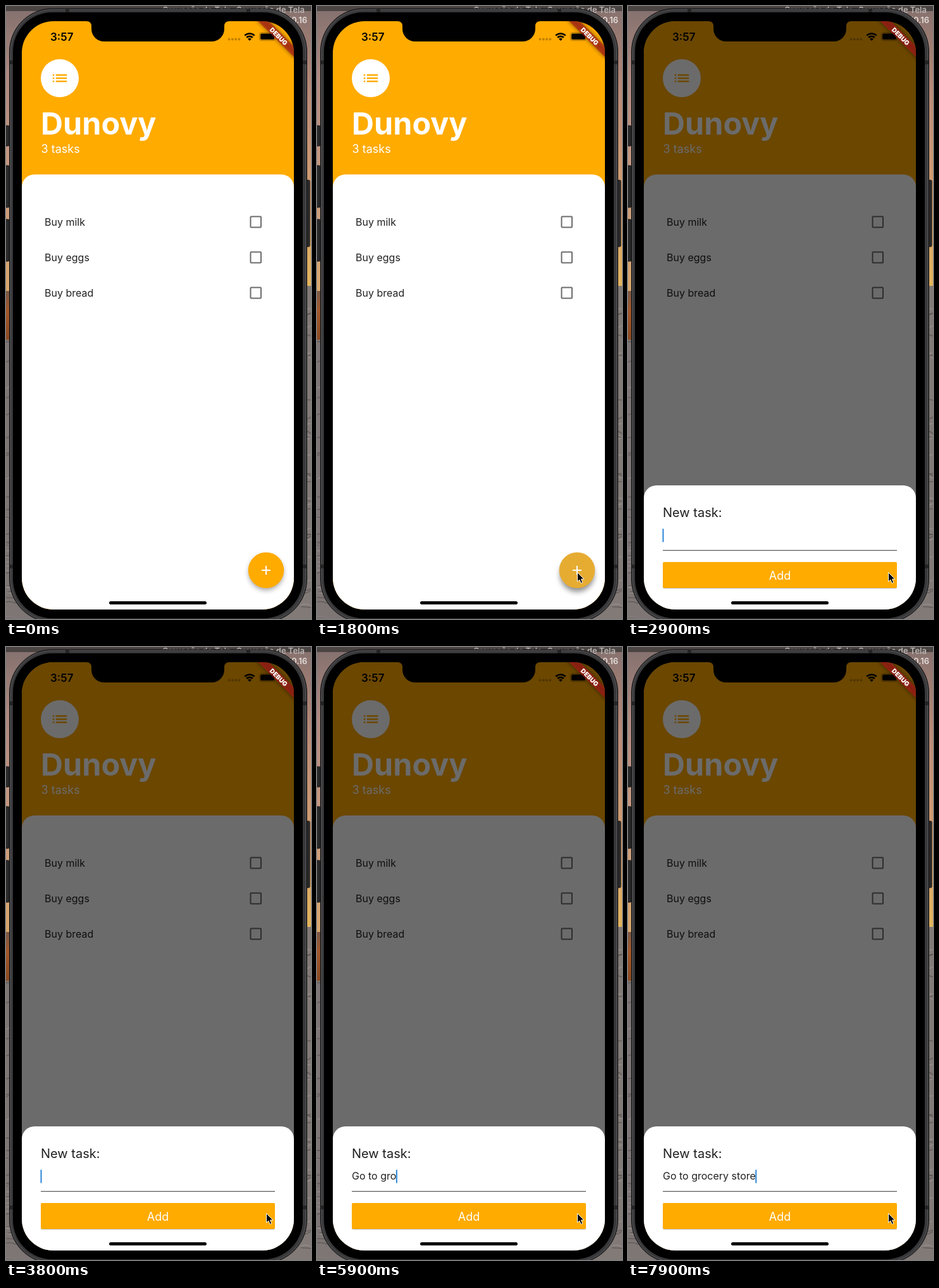
Write an HTML page that moves like this. It is 482x968 px and loops after 8 s.

```html
<!DOCTYPE html>
<html lang="en">
<head>
<meta charset="utf-8">
<title>Task list</title>
<style>
  html, body { margin: 0; width: 100%; height: 100%; overflow: hidden; background: #000; }
  svg { display: block; width: 482px; height: 968px; }
  text { font-family: Inter, "Liberation Sans", sans-serif; white-space: pre; }
</style>
</head>
<body>
<svg viewBox="0 0 482 968" xmlns="http://www.w3.org/2000/svg">
  <defs>
    <linearGradient id="skyLeft" x2="0" y2="1">
      <stop offset="0" stop-color="#82706e"/>
      <stop offset=".25" stop-color="#b08a80"/>
      <stop offset=".6" stop-color="#c99a80"/>
      <stop offset="1" stop-color="#d9a86c"/>
    </linearGradient>
    <linearGradient id="skyRight" x2="0" y2="1">
      <stop offset="0" stop-color="#85716e"/>
      <stop offset=".3" stop-color="#b98a78"/>
      <stop offset=".7" stop-color="#d6a070"/>
      <stop offset="1" stop-color="#e2b45e"/>
    </linearGradient>
    <linearGradient id="cliff" x2="0" y2="1">
      <stop offset="0" stop-color="#7a5a48"/>
      <stop offset=".4" stop-color="#a5582a"/>
      <stop offset="1" stop-color="#8a4a22"/>
    </linearGradient>
    <clipPath id="screen"><rect x="25" y="24" width="430" height="929" rx="50"/></clipPath>
    <filter id="blur4" x="-50%" y="-50%" width="200%" height="200%"><feGaussianBlur stdDeviation="4"/></filter>
    <filter id="blur3" x="-50%" y="-100%" width="200%" height="300%"><feGaussianBlur stdDeviation="3"/></filter>
  </defs>

  <!-- desktop -->
  <rect width="241" height="450" fill="url(#skyLeft)"/>
  <rect x="241" width="241" height="442" fill="url(#skyRight)"/>
  <rect width="482" height="8" fill="#4a4443"/>
  <rect y="450" width="241" height="78" fill="url(#cliff)"/>
  <rect y="527" width="241" height="441" fill="#7d7674"/>
  <rect x="241" y="442" width="241" height="526" fill="#827a77"/>
  <g id="rocks" stroke-width="1.5" fill="none"></g>
  <g font-size="13" font-weight="600" fill="#b9b3b1">
    <text x="247" y="11">Gravação de Tela</text>
    <text x="472" y="11" text-anchor="end">Gravação de Tela</text>
    <text x="476" y="27" text-anchor="end" fill="#e4dedc">20.10.16</text>
  </g>

  <!-- phone body -->
  <g id="buttons" fill="#2b2a2b" stroke="#151515"></g>
  <rect x="5.5" y="4" width="470" height="969" rx="68" fill="#38383a" stroke="#141414"/>
  <rect x="7.5" y="6" width="466" height="965" rx="66" fill="none" stroke="#5a5a5c" stroke-width=".8"/>
  <g id="bands" fill="#242425"></g>
  <rect x="11" y="10" width="458" height="957" rx="62" fill="#000"/>

  <g clip-path="url(#screen)">
    <rect x="25" y="24" width="430" height="929" fill="#ffab00"/>
    <circle cx="85" cy="114" r="30" fill="#fff"/>
    <path transform="translate(70 99) scale(1.25)" fill="#ffab00"
      d="M3 13h2v-2H3zm0 4h2v-2H3zm0-8h2V7H3zm4 4h14v-2H7zm0 4h14v-2H7zM7 7v2h14V7z"/>
    <text x="55" y="202.500" font-size="48.500" font-weight="700" fill="#fff">Dunovy</text>
    <text x="55.500" y="232" font-size="18" fill="#fff">3 tasks</text>
    <rect x="25" y="266" width="430" height="720" rx="20" fill="#fff"/>
    <g id="list" font-size="16" fill="#212121"></g>

    <g id="fab">
      <circle id="fabShadow" cx="411" cy="895" r="27" fill="#000" filter="url(#blur4)"/>
      <circle id="fabFace" cx="411" cy="891" r="28.300"/>
      <path d="M404 891h14M411 884v14" stroke="#fff" stroke-width="2"/>
    </g>

    <g id="sheet">
      <rect x="25" y="24" width="430" height="929" fill="#000" opacity=".58"/>
      <rect x="25" y="757" width="430" height="230" rx="20" fill="#fff"/>
      <text x="55" y="806.500" font-size="20" fill="#212121">New task:</text>
      <text id="entry" x="55" y="841" font-size="16" fill="#212121"></text>
      <rect id="caret" y="825.500" width="2" height="21" fill="#2b86d9"/>
      <rect x="55" y="859" width="370" height="1.200" fill="#555"/>
      <rect x="55" y="879" width="370" height="41" rx="2" fill="#000" opacity=".25"/>
      <rect x="55" y="878" width="370" height="41" rx="2" fill="#ffab00"/>
      <text x="240" y="905.500" font-size="18" text-anchor="middle" fill="#fff">Add</text>
    </g>

    <!-- status bar -->
    <text x="70" y="54.500" font-size="17" font-weight="600">3:57</text>
    <g id="dots" opacity=".25"></g>
    <g fill="none" stroke="#000" stroke-width="2.600">
      <path d="M377.300 46.600a11 11 0 0 1 15.400 0M380.200 49.800a7 7 0 0 1 9.600 0"/>
    </g>
    <path d="M385 55l-2.800-3a4 4 0 0 1 5.600 0z"/>
    <rect x="400.500" y="42" width="25" height="12.500" rx="3.500" fill="none" stroke="#000" stroke-opacity=".4"/>
    <rect x="402" y="43.500" width="22" height="9.500" rx="2.200"/>

    <!-- corner ribbon -->
    <g transform="translate(455 24) rotate(45)">
      <rect x="-44" y="28" width="88" height="12" fill="#000" opacity=".5" filter="url(#blur3)"/>
      <rect x="-44" y="28" width="88" height="12" fill="#b71c1c" opacity=".63"/>
      <text y="37.700" font-size="10" font-weight="900" text-anchor="middle" fill="#fff">DEBUG</text>
    </g>
    <rect x="163" y="940" width="154" height="5" rx="2.500"/>
  </g>
  <path d="M127 23H353v1q-8 0-8 8v4a20 20 0 0 1-20 20H155a20 20 0 0 1-20-20v-4q0-8-8-8z"/>

  <path id="pointer" d="M0 0V14.500L3.300 11.500 5.700 17 8.300 15.900 6 10.500H10.500Z" stroke="#fff"/>
</svg>

<script>
const LOOP = 8000, STEP = 100, OPEN = 1900;
const HOME = [411.5, 894.5], ENTRY = [486, 962];
const ENTER = 1000, ARRIVE = 1500;
const TASK = 'Go to grocery store';
// [time, characters typed]
const TYPING = [[3900, 0], [5000, 6], [6700, 13], [7900, 19]];

const $ = id => document.getElementById(id);
const add = (id, name, attrs, text = '') => {
  const el = document.createElementNS('http://www.w3.org/2000/svg', name);
  for (const key in attrs) el.setAttribute(key, attrs[key]);
  el.textContent = text;
  $(id).append(el);
};

['Buy milk', 'Buy eggs', 'Buy bread'].forEach((label, i) => {
  const y = 341 + 56 * i;
  add('list', 'text', { x: 61, y: y + 6 }, label);
  add('list', 'rect', { x: 386.5, y: y - 8.5, width: 16.5, height: 17, rx: 1,
    fill: 'none', stroke: '#6c6c6c', 'stroke-width': 2 });
});
for (let i = 0; i < 4; i++) add('dots', 'circle', { cx: 352.5 + 5.3 * i, cy: 52.5, r: 1.9 });
[[-2, 189, 32], [-2, 252, 66], [-2, 337, 66], [473, 275, 105]].forEach(([x, y, height]) =>
  add('buttons', 'rect', { x, y, width: 7, height, rx: 1.5 }));
[[6, 86], [469, 86], [6, 882], [469, 882]].forEach(([x, y]) =>
  add('bands', 'rect', { x, y, width: 6, height: 6 }));
[94, 380].forEach(x => add('bands', 'rect', { x, y: 4, width: 6, height: 6 }));

let seed = 7;
const random = () => (seed = seed * 16807 % 2147483647) / 2147483647;
for (let i = 0; i < 70; i++) {
  const right = i % 2;
  const x = right ? 466 : -2;
  const top = right ? 450 : 530;
  const y = top + random() * (968 - top);
  add('rocks', 'path', {
    d: `M${x} ${y}q9 ${random() * 8 - 6} 18 ${random() * 14 - 8}`,
    stroke: random() < .6 ? '#4f4a49' : '#a09896', opacity: .6
  });
}

const pen = document.createElement('canvas').getContext('2d');
pen.font = '16px Inter, "Liberation Sans", sans-serif';

function typedAt(t) {
  if (t <= TYPING[0][0]) return 0;
  const next = TYPING.findIndex(([time]) => time >= t);
  const [t0, n0] = TYPING[next - 1], [t1, n1] = TYPING[next];
  return Math.floor(n0 + (n1 - n0) * (t - t0) / (t1 - t0) + 1e-6);
}

function draw(t) {
  const open = t >= OPEN;
  const raw = Math.min(1, Math.max(0, (t - ENTER) / (ARRIVE - ENTER)));
  const ease = 1 - (1 - raw) ** 3;
  const [x, y] = ENTRY.map((from, i) => from + (HOME[i] - from) * ease);
  $('pointer').setAttribute('transform', `translate(${x} ${y})`);
  $('pointer').style.display = t < ENTER ? 'none' : '';

  const hover = Math.hypot(x - 411, y - 891) < 28;
  $('fabFace').setAttribute('fill', hover ? '#e6ac32' : '#ffab00');
  $('fabShadow').setAttribute('cy', hover ? 898 : 895);
  $('fabShadow').setAttribute('opacity', hover ? .45 : .4);
  $('sheet').style.display = open ? '' : 'none';

  const words = TASK.slice(0, typedAt(t));
  $('entry').textContent = words;
  $('caret').setAttribute('x', 54.5 + pen.measureText(words).width);
  const lit = words || (t + 300) % 1000 < 500;
  $('caret').setAttribute('opacity', lit ? 1 : 0);
}

const start = performance.now();
function tick() {
  const t = (performance.now() - start) % LOOP;
  draw(Math.floor(t / STEP) * STEP);
  requestAnimationFrame(tick);
}
draw(0);
requestAnimationFrame(tick);
</script>
</body>
</html>
```
